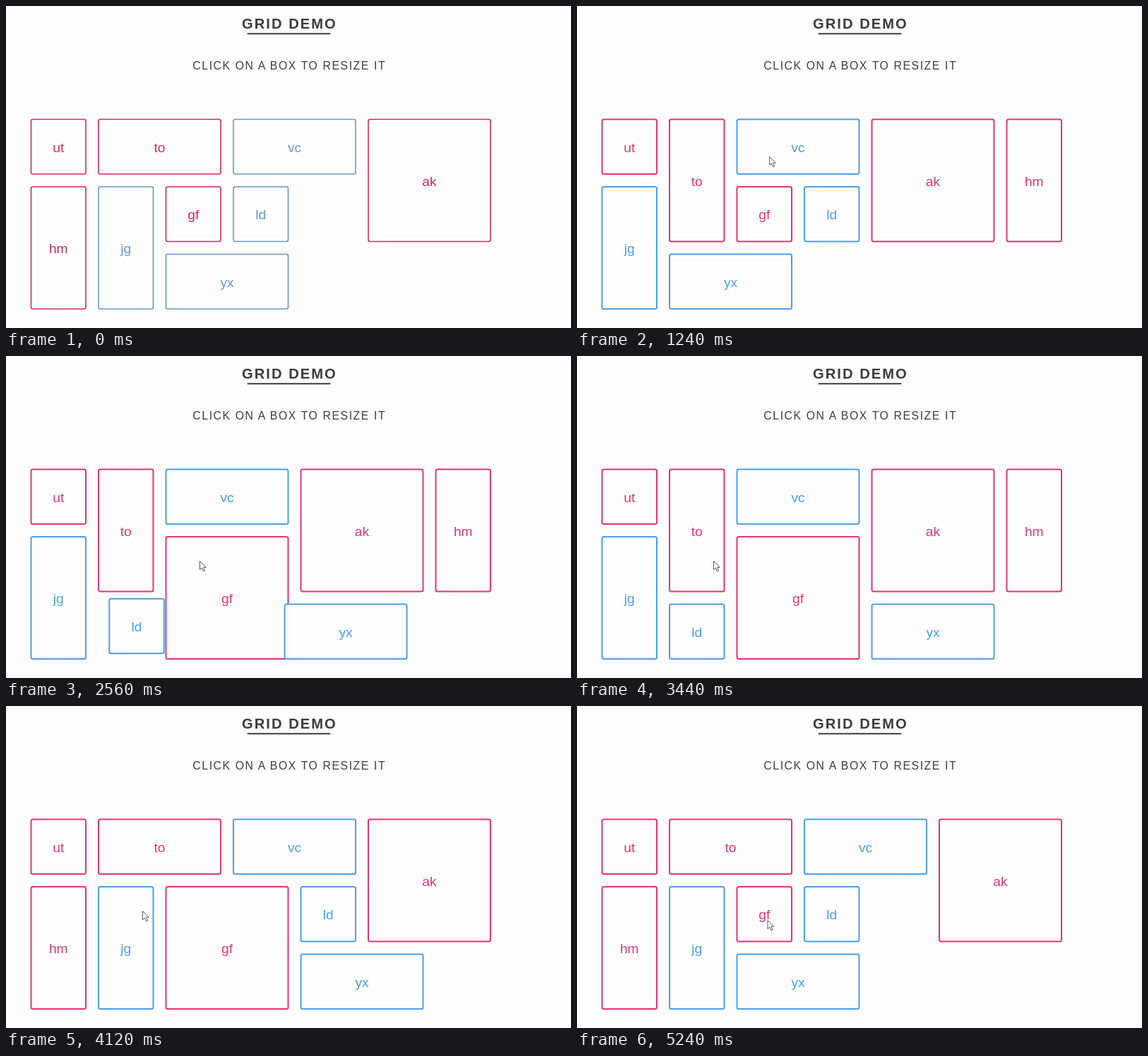
An HTML page for the animation above (6.04 s loop, 800x456 px).

```html
<!DOCTYPE html>
<html lang="en">
<head>
<meta charset="utf-8">
<title>Grid demo</title>
<style>
  html, body { margin: 0; width: 100%; height: 100%; overflow: hidden; background: #fefdfe; }
  svg { display: block; width: 100%; height: 100%; --pink: #de3672; --blue: #4c9fe6; --line: 2; }
  svg.muted { --pink: #d42a58; --blue: #6598d0; --line: 1.6; }
  text { font-family: "Liberation Sans", Arial, sans-serif; fill: #3c3c3e; text-anchor: middle; }
  .title { font-size: 20.2px; font-weight: bold; letter-spacing: 2.02px; }
  .hint { font-size: 15.8px; letter-spacing: 1.58px; }
  .box rect { fill: #fefdfe; fill-opacity: .95; stroke: var(--color); stroke-width: var(--line); }
  .box text { font-size: 19.2px; fill: var(--color); }
  .pink { --color: var(--pink); }
  .blue { --color: var(--blue); }
</style>
</head>
<body>
<svg id="stage" viewBox="0 0 800 456">
  <text class="title" x="401.4" y="32">GRID DEMO</text>
  <rect x="341.5" y="38.2" width="118" height="2" rx="1" fill="#3c3c46"/>
  <text class="hint" x="401.2" y="89.5">CLICK ON A BOX TO RESIZE IT</text>
  <g id="boxes"></g>
  <path id="cursor" d="M0 0V12.2L2.9 9.6 5 14.4 7 13.5 5 8.9H8.6Z" fill="#fff" stroke="#44444c" stroke-width=".9"/>
</svg>
<script>
const LOOP = 6040, TICK = 40, MOVE = 350, LABEL_MOVE = 300;
const COLUMNS = 7, PITCH = 95.5, GAP = 16, LEFT = 34.5, TOP = 159.5;

const items = [
  ["ut", "pink", 1, 1], ["to", "pink", 2, 1], ["vc", "blue", 2, 1],
  ["ak", "pink", 2, 2], ["hm", "pink", 1, 2], ["jg", "blue", 1, 2],
  ["gf", "pink", 1, 1], ["ld", "blue", 1, 1], ["yx", "blue", 2, 1]
].map(([name, color, cols, rows]) => ({ name, color, cols, rows }));

const clicks = [
  { at: 440, name: "to", cols: 1, rows: 2 },
  { at: 2280, name: "gf", cols: 2, rows: 2 },
  { at: 3560, name: "to", cols: 2, rows: 1 },
  { at: 4840, name: "gf", cols: 1, rows: 1 }
];

const cursorMoves = [
  { from: 1160, to: 1760, x: 274.5, y: 290.5 },
  { from: 3080, to: 3440, x: 193.5, y: 290.5 },
  { from: 4120, to: 4640, x: 270, y: 303.5 }
];

// Dense auto-placement: each item takes the first free slot, row by row.
function pack(list) {
  const used = new Set();
  return list.map(({ cols, rows }) => {
    for (let slot = 0; ; slot++) {
      const col = slot % COLUMNS, row = Math.floor(slot / COLUMNS);
      if (col + cols > COLUMNS) continue;
      const cells = [];
      for (let r = 0; r < rows; r++)
        for (let c = 0; c < cols; c++) cells.push((row + r) * COLUMNS + col + c);
      if (cells.some(cell => used.has(cell))) continue;
      cells.forEach(cell => used.add(cell));
      return {
        x: LEFT + col * PITCH, y: TOP + row * PITCH,
        w: cols * PITCH - GAP, h: rows * PITCH - GAP
      };
    }
  });
}

let sizes = items;
const layouts = [pack(sizes)];
for (const { name, cols, rows } of clicks) {
  sizes = sizes.map(item => item.name === name ? { ...item, cols, rows } : item);
  layouts.push(pack(sizes));
}

const stage = document.getElementById("stage");
const cursor = document.getElementById("cursor");

function add(parent, tag, attributes) {
  const node = document.createElementNS("http://www.w3.org/2000/svg", tag);
  set(node, attributes);
  return parent.appendChild(node);
}

function set(node, attributes) {
  for (const key in attributes) node.setAttribute(key, attributes[key]);
}

const boxes = items.map(({ name, color }) => {
  const group = add(document.getElementById("boxes"), "g", { class: "box " + color });
  const rect = add(group, "rect", { x: 1, y: 1, rx: 2.5 });
  const label = add(group, "text", {});
  label.textContent = name;
  return { group, rect, label };
});

const mix = (a, b, p) => a + (b - a) * p;

function ease(x) {
  const p = Math.min(1, Math.max(0, x));
  return p < .5 ? 2 * p * p : 1 - 2 * (1 - p) ** 2;
}

function drawBoxes(t) {
  const step = clicks.filter(click => click.at <= t).length;
  const now = layouts[step], before = layouts[Math.max(0, step - 1)];
  const elapsed = step ? t - clicks[step - 1].at : MOVE;
  const p = ease(elapsed / MOVE), labelP = ease(elapsed / LABEL_MOVE);
  boxes.forEach(({ group, rect, label }, i) => {
    const a = before[i], b = now[i];
    set(group, { transform: `translate(${mix(a.x, b.x, p)} ${mix(a.y, b.y, p)})` });
    set(rect, { width: b.w - 2, height: b.h - 2 });
    set(label, { x: b.w / 2, y: mix(a.h, b.h, labelP) / 2 + 7.6 });
  });
}

function drawCursor(t) {
  let x = 272.5, y = 210.5;
  for (const move of cursorMoves) {
    const p = ease((t - move.from) / (move.to - move.from));
    x = mix(x, move.x, p);
    y = mix(y, move.y, p);
  }
  set(cursor, { transform: `translate(${x} ${y})`, visibility: t < 80 ? "hidden" : "visible" });
}

const start = performance.now();

function frame() {
  const time = (performance.now() - start) % LOOP;
  const t = Math.floor(time / TICK) * TICK;
  stage.classList.toggle("muted", t < 80);
  drawBoxes(t);
  drawCursor(t);
  requestAnimationFrame(frame);
}
frame();
</script>
</body>
</html>
```
